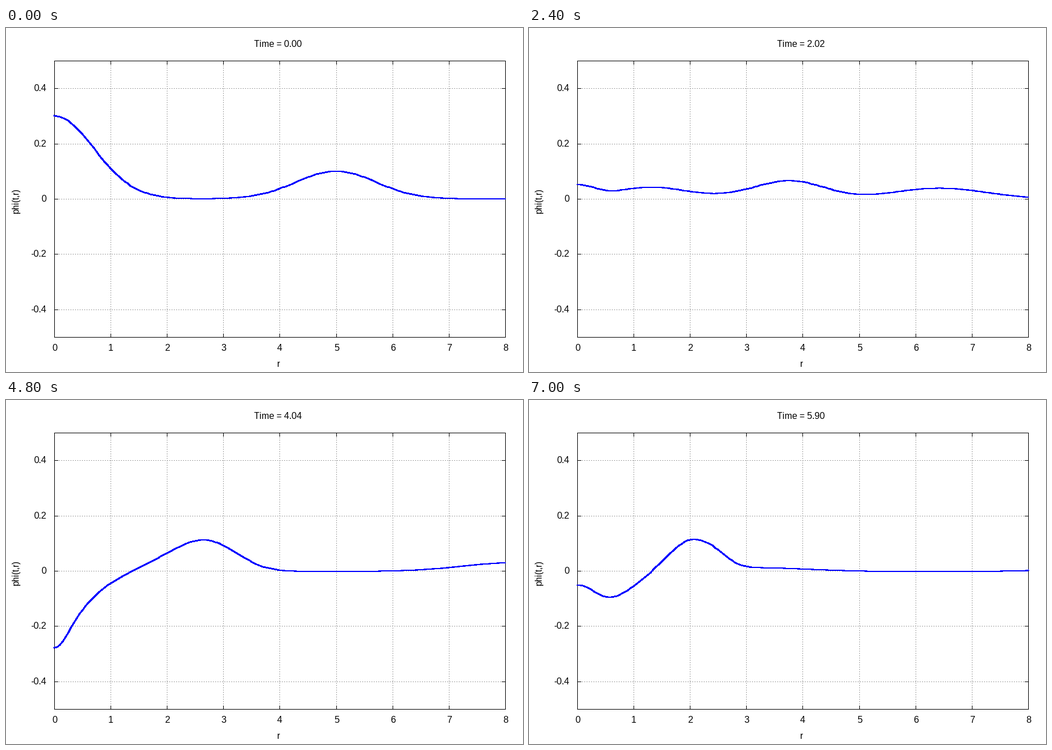
A matplotlib script that plays this animation: 900x600 px, repeating every 7100 ms.

```python
import numpy as np
import matplotlib.pyplot as plt
from matplotlib.animation import FuncAnimation

plt.rcParams["font.family"] = "Liberation Sans"
plt.rcParams["text.hinting"] = "native"
plt.rcParams["text.hinting_factor"] = 1

W, H, DPI = 900, 600, 100
PX = 72 / DPI
LEFT, RIGHT, TOP, BOTTOM = 84, 869, 57, 539
FRAMES, INTERVAL, TIME_STEP = 71, 100, 0.08425

# Staggered radial grid; the lapse is held at EDGE_LAPSE at r = R_EDGE
R_MAX, DR = 12.0, 0.01
R_EDGE, EDGE_LAPSE = 8.0, 1.13
r = (np.arange(round(R_MAX / DR)) + 0.5) * DR
faces = np.arange(len(r) + 1) * DR
shell = np.diff(faces**3) / 3


def integral(f):
    return (np.cumsum(f) - f / 2) * DR


def light_speed(phi, pi):
    """Lapse over radial metric function, in polar-areal gauge."""
    padded = np.concatenate(([phi[0]], phi, [phi[-1]]))
    slope = (padded[2:] - padded[:-2]) / (2 * DR)
    source = 2 * np.pi * r * (slope**2 + pi**2)
    growth = np.exp(2 * integral(source))
    mass = integral(growth * source * r) / growth
    a2 = 1 / (1 - 2 * mass / r)
    log_lapse = integral((a2 - 1) / (2 * r) + source)
    log_lapse -= np.interp(R_EDGE, r, log_lapse)
    return EDGE_LAPSE * np.exp(log_lapse) / np.sqrt(a2)


def rates(state):
    phi, pi = state
    speed = light_speed(phi, pi)
    flux = np.zeros(len(faces))
    flux[1:-1] = faces[1:-1]**2 * (speed[1:] + speed[:-1]) / 2 * np.diff(phi) / DR
    return np.array([speed * pi, np.diff(flux) / shell])


def rk4(state, dt):
    k1 = rates(state)
    k2 = rates(state + dt / 2 * k1)
    k3 = rates(state + dt / 2 * k2)
    k4 = rates(state + dt * k3)
    return state + dt / 6 * (k1 + 2 * k2 + 2 * k3 + k4)


def evolve():
    phi = 0.3 * np.exp(-r**2) + 0.1 * np.exp(-(r - 5)**2)
    state = np.array([phi, np.zeros_like(r)])
    substeps = 16
    history = [state[0]]
    for _ in range(FRAMES - 1):
        for _ in range(substeps):
            state = rk4(state, TIME_STEP / substeps)
        history.append(state[0])
    return history


def to_x(radius):
    return np.round(LEFT + radius * (RIGHT - LEFT) / 8)


def to_y(value):
    return np.round((TOP + BOTTOM) / 2 - value * (BOTTOM - TOP))


history = evolve()
samples = np.linspace(0, 8, 161)

fig = plt.figure(figsize=(W / DPI, H / DPI), dpi=DPI, facecolor="white")
ax = fig.add_axes([0, 0, 1, 1])
ax.set_xlim(0, W)
ax.set_ylim(H, 0)
ax.axis("off")


def segment(xs, ys):
    ax.plot(np.array(xs) + 0.5, np.array(ys) + 0.5, color="black", lw=PX,
            snap=False, solid_capstyle="projecting", solid_joinstyle="miter")


def dotted(xs, ys):
    ax.plot(xs, ys, color="#a0a0a0", lw=PX, snap=False,
            dashes=(2, 2), dash_capstyle="butt")


def label(x, y, text, **style):
    return ax.text(x, y, text, fontsize=16 * PX, **style)


for value in (-0.4, -0.2, 0, 0.2, 0.4):
    y = to_y(value)
    dotted([LEFT, RIGHT], [y + 0.5, y + 0.5])
    segment([LEFT, LEFT + 6], [y, y])
    segment([RIGHT, RIGHT - 6], [y, y])
    label(70.5, y + 5, f"{value:g}", ha="right")
for n in range(9):
    x = to_x(n)
    if 0 < n < 8:
        dotted([x + 0.5, x + 0.5], [TOP, BOTTOM])
    segment([x, x], [BOTTOM, BOTTOM - 6])
    segment([x, x], [TOP, TOP + 6])
    label(x + 0.5, 563, str(n), ha="center")
segment([LEFT, RIGHT, RIGHT, LEFT, LEFT], [TOP, TOP, BOTTOM, BOTTOM, TOP])

label(474.5, 591, "r", ha="center")
label(24.5, 323, "phi(t,r)", rotation=90, ha="right", va="bottom")
title = label(432, 33, "")
curve, = ax.plot([], [], color="blue", lw=1.8 * PX, antialiased=False)


def draw(frame):
    title.set_text(f"Time = {frame * TIME_STEP:.2f}")
    curve.set_data(to_x(samples), to_y(np.interp(samples, r, history[frame])))
    return title, curve


anim = FuncAnimation(fig, draw, frames=FRAMES, interval=INTERVAL, repeat=True)
plt.show()
```
